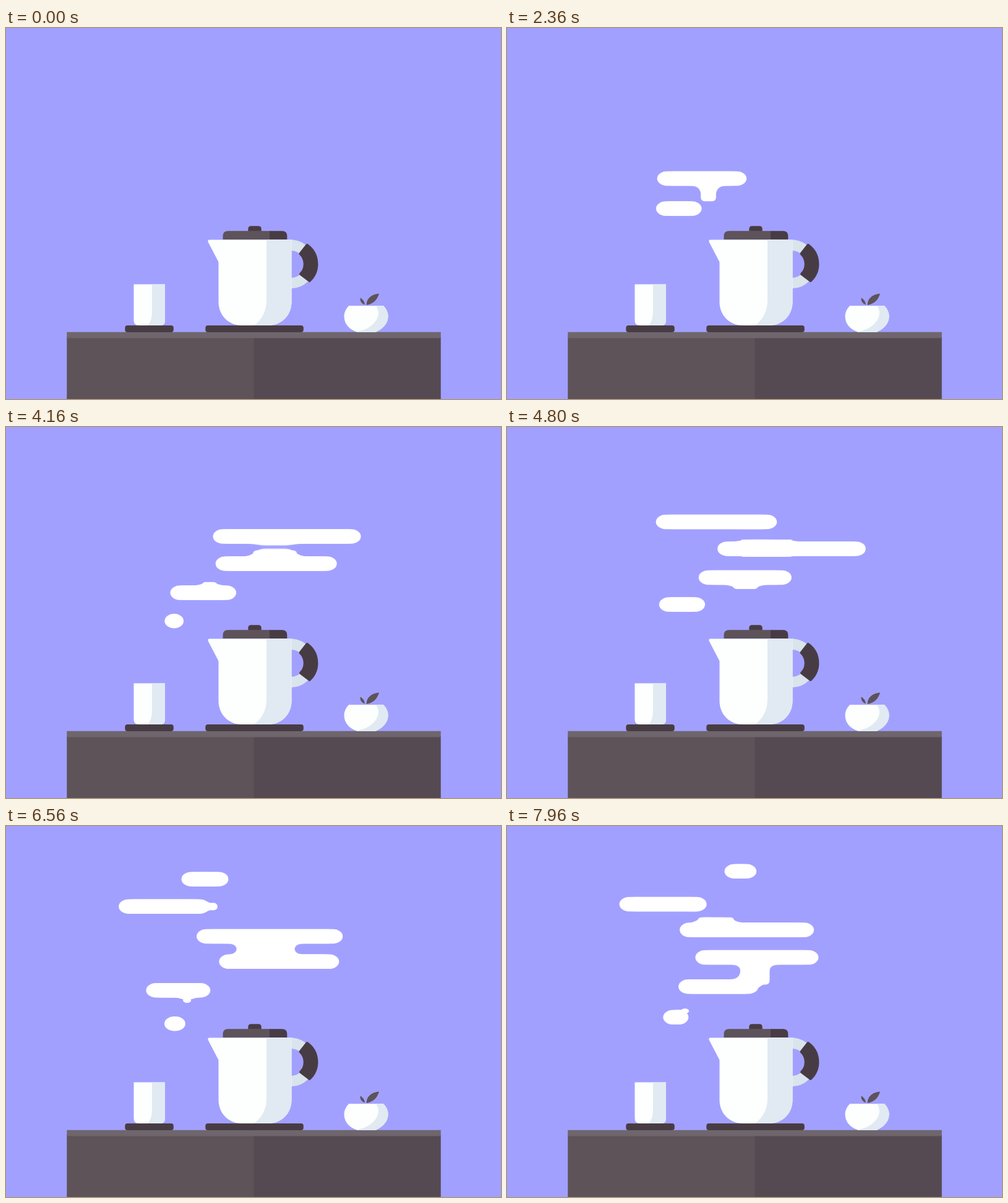
Animation, 800 px wide and 600 px high, one loop 8000 ms. Source, as an HTML page:

```html
<!DOCTYPE html>
<html lang="en">
<head>
<meta charset="utf-8">
<title>Steaming kettle</title>
<style>
  html, body { margin: 0; width: 100%; height: 100%; overflow: hidden; background: #a2a0ff; }
  svg { display: block; width: 100vw; height: 100vh; }
  .dark { fill: #483c44; }
  .brown { fill: #5d5359; }
  .white { fill: #fcfffe; }
  .shade { fill: #e1eaf2; }
</style>
</head>
<body>
<svg viewBox="0 0 800 600">
  <filter id="goo" filterUnits="userSpaceOnUse" x="0" y="0" width="800" height="400" color-interpolation-filters="sRGB">
    <feGaussianBlur stdDeviation="7.5" result="blur"/>
    <feColorMatrix in="blur" values="1 0 0 0 0  0 1 0 0 0  0 0 1 0 0  0 0 0 20 -9.5" result="goo"/>
    <feMerge>
      <feMergeNode in="goo"/>
      <feMergeNode in="SourceGraphic"/>
    </feMerge>
  </filter>
  <g id="steam" fill="#fff" filter="url(#goo)"></g>

  <!-- table -->
  <path class="brown" d="M98.3 500H401V600H98.3Z"/>
  <path fill="#554a52" d="M400.5 500H702.7V600H400.5Z"/>
  <path fill="#6f666d" d="M98.3 491.8H702.7V501.5H98.3Z"/>
  <rect class="dark" x="192.3" y="481" width="78.5" height="11" rx="4"/>
  <rect class="dark" x="322.3" y="481" width="158.5" height="11" rx="4"/>

  <!-- cup -->
  <path class="white" d="M206.5 414.5H257V473Q257 481 249 481H215Q206.5 481 206.5 473Z"/>
  <path class="shade" d="M236 414.5H257V473Q257 481 249 481H229Q236 474 236 458Z"/>

  <!-- kettle -->
  <path fill="#dae4ec" d="M461 342.5H464A39.5 39.5 0 0 1 461 421.3V404A21.5 21.5 0 0 0 461 360Z"/>
  <path class="dark" stroke="#483c44" stroke-width="4" stroke-linejoin="round"
        d="M486.5 351A37.5 37.5 0 0 1 490.5 409L476 398A23 23 0 0 0 475.5 365Z"/>
  <path class="white" d="M328.5 342.5H461.5V443C461.5 465 445 481 424 481H381C360 481 343.5 465 343.5 443V378.5L326.6 346Q325.7 342.5 328.5 342.5Z"/>
  <path class="shade" d="M421 342.5H461.5V443C461.5 465 445 481 424 481H401Q421 466 421 440Z"/>
  <path class="brown" d="M350.5 342V336.5Q350.5 328.3 359 328.3H427V342Z"/>
  <path class="dark" d="M426 328.3H446Q454.3 328.3 454.3 336.5V342H426Z"/>
  <path class="dark" d="M391.3 328.5V325Q391.3 320.3 396 320.3H408Q412.7 320.3 412.7 325V328.5Z"/>

  <!-- bowl -->
  <path class="white" d="M554 449.3H610Q617.5 457 617.5 466C617.5 480 606 488 597 492H568C556 488 546.5 480 546.5 466Q546.5 457 554 449.3Z"/>
  <path class="shade" d="M598 449.3H610Q617.5 457 617.5 466C617.5 480 606 488 597 492H568Q568 491 571 490.3C592 486 610 467 598 449.3Z"/>
  <path class="brown" d="M582.5 448Q583 432 603 429.5Q598 446 582.5 448ZM580 447.5Q571.5 445 572.5 436.3Q579 440 580 447.5Z"/>
</svg>
<script>
const LOOP = 8000, STEP = 40;
const { PI, abs, cos, min, max } = Math;
const steam = document.getElementById('steam');

// Each puff: time of greatest width, sideways lag, vertical offset, extra climb per ms.
const puffs = [
  [3955, 600, -3, 0],
  [4998, 100, 2, .001],
  [6313, 0, 0, 0],
  [7429, 0, 0, 0],
  [8754, 530, -4, 0],
  [9781, 100, 0, .0025],
  [11078, 200, 2, 0],
  [12135, 100, 2, 0]
].map(([peak, lag, lift, climb]) => ({ peak, lag, lift, climb }));

const box = (x, y, w, h, rx, ry) => w > 0 && h > 0
  ? `<rect x="${x - w / 2}" y="${y - h / 2}" width="${w}" height="${h}" rx="${rx}" ry="${ry}"/>`
  : '';

// A slow drift to the right, then a quicker swing left and back.
const sway = age => age < -300
  ? 365 - 95 * cos(PI * (age + 3100) / 2800)
  : 355 + 105 * cos(PI * (age + 300) / 2080);

const height = ({ peak, lift, climb }, t) => {
  const age = t - peak;
  return 187.5 + lift - (.0365 + climb) * age - 2e-10 * age ** 3;
};

function drawPuff(puff, t) {
  const age = t - puff.peak;
  const fade = min(1, max(0, (800 - age) / 1275));
  const w = 253 - .068 * abs(age), h = min(23.5, w);
  return box(sway(age - puff.lag * fade), height(puff, t), w, h, min(16, w / 2), h / 2);
}

// A wisp hangs below one puff, widens, and sinks into the next.
function drawWisp(upper, lower, t) {
  const age = t - upper.peak - upper.lag;
  if (age < -3400) return '';
  const x = 360 + 75 * cos(PI * (age + 500) / (age < -500 ? 2600 : 3600));
  const y = min(203 - .029 * age, height(lower, t));
  const w = max(13, 92 - .026 * abs(age - 400));
  const h = min(30, 30 - .009 * age, max(8, 2 * w - 22));
  return box(x, y, w, h, 6, 6);
}

function draw(now) {
  const t = Math.floor(now % LOOP / STEP) * STEP;
  steam.innerHTML = puffs.map((puff, i) =>
    drawPuff(puff, t) + (i % 2 ? '' : drawWisp(puff, puffs[i + 1], t))).join('');
  requestAnimationFrame(draw);
}
requestAnimationFrame(draw);
</script>
</body>
</html>
```
